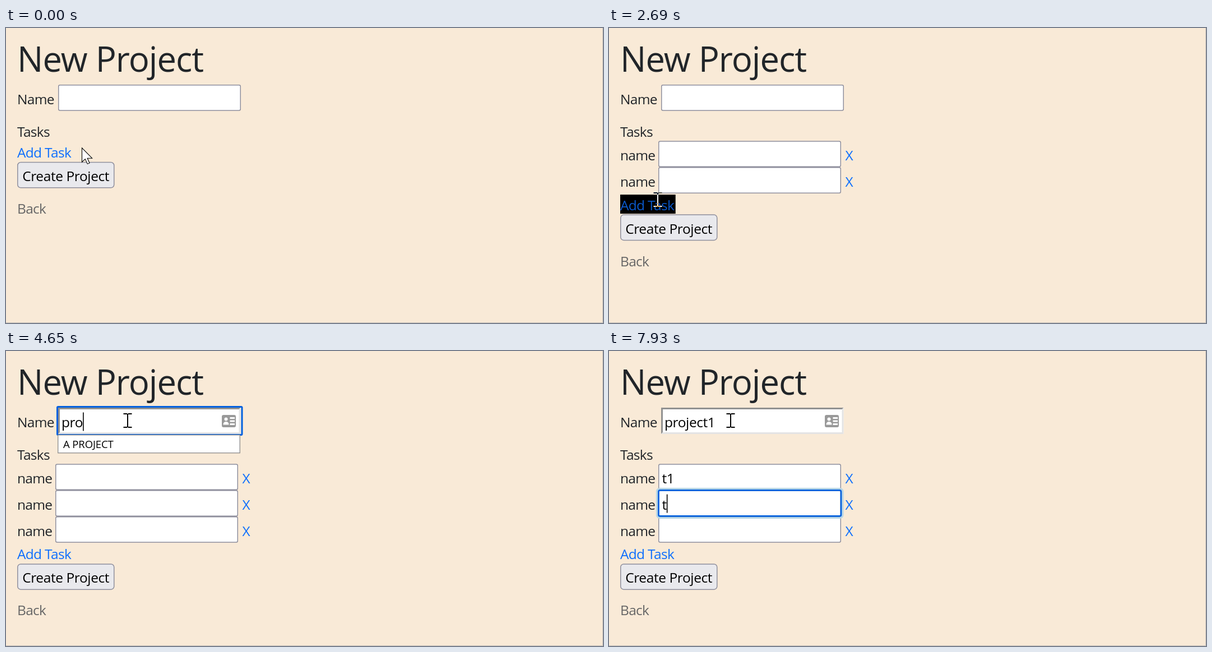
Animation, 1065 px wide and 526 px high, one loop 8000 ms. Source, as an HTML page:

```html
<!DOCTYPE html>
<html lang="en">
<head>
<meta charset="utf-8">
<title>New Project</title>
<style>
  html, body { margin: 0; height: 100%; overflow: hidden; background: #f9ead7; }
  svg { display: block; width: 100vw; height: 100vh; }
  text { font: 24.5px "Open Sans", "Noto Sans", sans-serif; letter-spacing: -.7px; fill: #212529; white-space: pre; }
  text.title { font-size: 61.5px; letter-spacing: -.95px; }
  text.control { letter-spacing: -.4px; }
  text.item { font-size: 18.5px; letter-spacing: -.1px; }
  .ibeam { mix-blend-mode: difference; }
</style>
</head>
<body>
<svg id="stage" viewBox="0 0 1065 526"></svg>
<script>
const LOOP = 8000, PITCH = 46.8, STEP = 84;
const BLACK = '#000', LINK = '#0d6efd', FOCUS = '#0060df';
const stage = document.getElementById('stage');
const pen = document.createElement('canvas').getContext('2d');

// pointer moves: start, number of steps, destination
const MOVES = [
  [80, 1, 127, 213],
  [690, 5, 90, 233],
  [1520, 7, 85, 265],
  [2440, 6, 87, 313],
  [3150, 6, 217, 124]
];
const ROWS = [1280, 2190, 2950];
const TYPED = {
  name: [[4320, 'p'], [4490, 'pr'], [4650, 'pro'], [4820, 'proj'], [4910, 'proje'],
         [5080, 'projec'], [5240, 'project'], [5400, 'project1']],
  rows: [[[7080, 't'], [7320, 't1']], [[7930, 't']], []]
};

const rect = (x, y, w, h, fill, more = '') =>
  `<rect x="${x}" y="${y}" width="${w}" height="${h}" fill="${fill}" ${more}/>`;
const path = (d, fill, more = '') => `<path d="${d}" fill="${fill}" ${more}/>`;
const text = (x, y, s, fill = '#212529', cls = '') =>
  `<text x="${x}" y="${y}" class="${cls}" style="fill:${fill}">${s}</text>`;
const control = (x, y, s) => text(x, y, s, BLACK, 'control');
const outline = (color, width, r) => `stroke="${color}" stroke-width="${width}" rx="${r}"`;
const between = (t, a, b) => t >= a && t < b;
const typedAt = (list, t) => list.reduce((s, [at, value]) => t >= at ? value : s, '');

function textWidth(s) {
  pen.font = '24.5px "Open Sans", "Noto Sans", sans-serif';
  pen.letterSpacing = '-0.4px';
  return pen.measureText(s).width;
}

function pointerAt(t) {
  let x = 135, y = 213;
  for (const [start, n, toX, toY] of MOVES) {
    if (t < start) break;
    const k = Math.min(n, Math.floor((t - start + 5) / STEP) + 1);
    const p = 1 - (1 - k / n) ** 1.75;
    x += (toX - x) * p;
    y += (toY - y) * p;
  }
  return { x: Math.round(x), y: Math.round(y) };
}

const inside = (p, x, y, w, h) => p.x >= x && p.x <= x + w && p.y >= y && p.y <= y + h;

function box(x, y, p) {
  const border = inside(p, x, y, 326, 46.8) ? '#676774' : '#8f8f9d';
  return rect(x + .75, y + .75, 324.5, 45.3, '#fff', outline(border, 1.5, 2.5));
}

const caret = (x, y, s) => rect(x + textWidth(s), y, 1.6, 33, BLACK);

function idCard(color) {
  return rect(385, 114, 25, 22, color, 'rx="3"') +
    '<circle cx="392.5" cy="121.5" r="3" fill="#fff"/>' +
    path('M387.5 131.5q0-5.5 5-5.5t5 5.5z', '#fff') +
    [118, 123.5, 129].map(y => rect(399.5, y, 8.5, 3, '#fff')).join('');
}

function nameField(t, p) {
  if (t < 3740) return box(93, 101, p);
  const s = typedAt(TYPED.name, t);
  const focused = between(t, 3820, 6330);
  let out = rect(93, 101, 325.5, 47, '#fff') +
    path('M93 148V101H418.5l-3 3H96V145z', '#919191') +
    path('M418.5 101V148H93l3-3H415.5V104z', '#e4e4e4') +
    idCard(t < 3910 ? BLACK : '#999') + control(99, 136, s);
  if (focused) {
    out += rect(91.5, 99.5, 329.5, 50, 'none', outline(FOCUS, 3, 1.5));
    if (t < 5900) out += caret(99, 109.5, s);
  }
  return out;
}

function suggestions(t) {
  if (!between(t, 4400, 5490)) return '';
  const two = t < 4570;
  return rect(92.75, 149.75, 324.5, two ? 64 : 32, '#fff', outline('#8a8a8a', 1.3, 0)) +
    text(102, 173, 'A PROJECT', BLACK, 'item') +
    (two ? text(102, 205, 'p1', BLACK, 'item') : '');
}

function taskRow(i, t, p) {
  const y = 201.3 + i * PITCH;
  return text(20, y + 35, 'name') + box(88, y, p) + text(421.5, y + 35, 'X', LINK) +
    control(94.5, y + 35, typedAt(TYPED.rows[i], t));
}

function taskFocus(t) {
  if (t < 6330) return '';
  const i = t < 7590 ? 0 : 1, y = 201.3 + i * PITCH;
  const lit = !between(t, 6910, 7080);
  return rect(85.5, y - 2.6, 331.4, 51.8, 'none', outline('#b8d6e5', 3.2, 5)) +
    rect(88.4, y + .3, 325.6, 46, 'none', outline(FOCUS, 2.7, 2.5)) +
    (lit ? caret(94.6, y + 7.5, typedAt(TYPED.rows[i], t)) : '');
}

function pointer({ x, y }, ibeam) {
  const at = `transform="translate(${x} ${y})"`;
  return ibeam
    ? path('M-7.5-13H-1.5L0-12 1.5-13H7.5V-11H1V11H7.5V13H1.5L0 12-1.5 13H-7.5V11H-1V-11H-7.5z', '#fff', at + ' class="ibeam"')
    : path('M.5.8V26L6.3 20.6 10.3 29.4 14 27.8 10.2 19.2H18.6z', '#fff', at + ' stroke="#000" stroke-width="1.1"');
}

function draw(t) {
  const p = pointerAt(t);
  const count = ROWS.filter(at => t >= at).length;
  const shift = count * PITCH;
  const hover = inside(p, 20, 203.5 + shift, 98.7, 34);
  let out = rect(0, 0, 1065, 526, '#f9ead7') +
    rect(1064, 0, 1, 526, '#c4beb8') + rect(0, 525, 1065, 1, '#c4beb8') +
    text(20, 78, 'New Project', undefined, 'title') +
    text(20, 136, 'Name') + text(20, 194, 'Tasks') + nameField(t, p);
  for (let i = 0; i < count; i++) out += taskRow(i, t, p);
  if (hover) out += rect(20, 203.5 + shift, 98.7, 34, BLACK);
  out += text(20, 231 + shift, 'Add Task', hover ? '#0a58ca' : LINK) +
    rect(20.75, 239.5 + shift, 172, 45.3, '#e9e9ed', outline('#8f8f9d', 1.5, 5.5)) +
    control(29.2, 273 + shift, 'Create Project') +
    text(20, 331 + shift, 'Back', '#666') +
    taskFocus(t) + suggestions(t) + pointer(p, t >= 690);
  return out;
}

let last = '';
function frame(now) {
  const next = draw(now % LOOP);
  if (next !== last) stage.innerHTML = last = next;
  requestAnimationFrame(frame);
}
frame(0);
</script>
</body>
</html>
```
